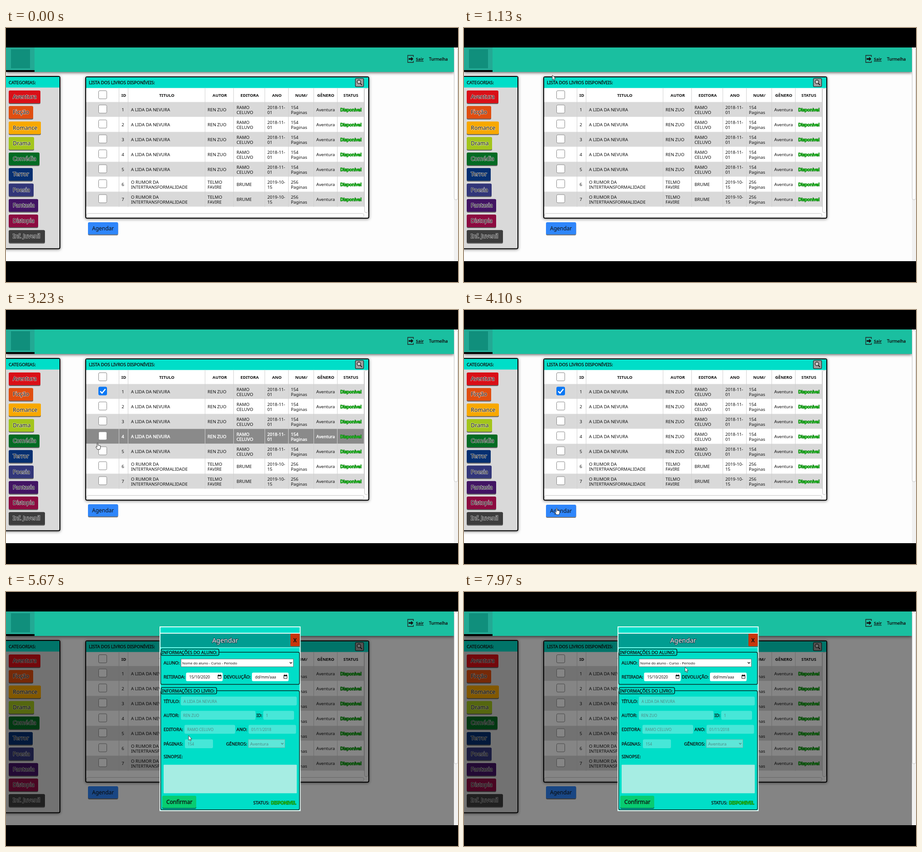
An HTML page that plays this animation: 998x561 px, repeating every 8000 ms.

```html
<!DOCTYPE html>
<html lang="pt-BR">
<head>
<meta charset="utf-8">
<title>Lista de livros</title>
<style>
html, body { margin: 0; width: 100%; height: 100%; overflow: hidden; background: #000; }
svg { display: block; font-family: "Noto Sans", "Open Sans", sans-serif; }
text { fill: #111; white-space: pre; }
.medium { stroke: #111; stroke-width: .35px; }
.bold { font-weight: 700; }
.halo { stroke: #fff; stroke-opacity: .7; stroke-width: 1.6px; paint-order: stroke; stroke-linejoin: round; }
.free { fill: #2cf52c; stroke: #08690b; stroke-width: 1.5px; paint-order: stroke; stroke-linejoin: round; }
.title { fill: #fff; stroke: #123; stroke-width: 1.6px; paint-order: stroke; }
.muted { fill: #4b8c86; }
.panel { filter: drop-shadow(0 1px 3px #0008); }
.row.hover .bg { fill: #8a8a8a; }
.row.hover .cell { fill: #fff; stroke: #fff; stroke-width: .4px; }
.tick { visibility: hidden; }
.checked .tick { visibility: visible; }
.checked .box { fill: #0a78f5; stroke: #0a78f5; }
.checked.over .box { fill: #0758bd; stroke: #0758bd; }
</style>
</head>
<body>
<svg id="stage" width="998" height="561" viewBox="0 0 998 561"></svg>
<script>
const TEAL = '#00dec8';
const BOOK = 'A LIDA DA NEVURA', AUTHOR = 'REN ZUO', PRESS = ['RAMO', 'CELUVO'];

const text = (x, y, s, size = 9.7, cls = '', anchor = 'start') =>
  `<text x="${x}" y="${y}" font-size="${size}" class="${cls}" text-anchor="${anchor}">${s}</text>`;
const rect = (x, y, w, h, fill, r = 0, extra = '') =>
  `<rect x="${x}" y="${y}" width="${w}" height="${h}" rx="${r}" fill="${fill}" ${extra}/>`;
const path = (d, stroke, width, fill = 'none') =>
  `<path d="${d}" fill="${fill}" stroke="${stroke}" stroke-width="${width}"/>`;
const label = (x, y, s, size = 9.6) => text(x, y, s, size, 'medium');
const pill = (x, y, w, h) => rect(x, y, w, h, '#fcfcfc', 4, 'stroke="#c4c4c4"');
const button = (x, y, w, h, fill) =>
  rect(x, y + 1, w, h, '#0008', 3) + rect(x, y, w, h - 1, fill, 3);
const checkbox = y => `<g class="check">` +
  rect(204.5, y - 9, 18, 18, '#fff', 2.5, 'stroke="#858585" class="box"') +
  `<path class="tick" d="M208 ${y + .5}l4 4 7.5-9" fill="none" stroke="#fff" stroke-width="2.6"/></g>`;

function sidebar() {
  const items = [
    ['Aventura', 70, '#d90f17'], ['Ficção', 54, '#e04e10'], ['Romance', 71, '#f8a800'],
    ['Drama', 56, '#a3c51c'], ['Comédia', 68, '#046b23'], ['Terror', 53, '#062f70'],
    ['Poesia', 55, '#323679'], ['Fantasia', 65, '#421463'], ['Distopia', 65, '#8c0b40'],
    ['Inf. Juvenil', 80, '#3d3d3d']];
  return `<g class="panel">` + rect(-4, 107, 123, 380.5, '#d9d9d9', 3, 'stroke="#000" stroke-width="2"') + `</g>` +
    rect(0, 108, 118, 23.5, TEAL) + label(6, 123.5, 'CATEGORIAS:') +
    items.map(([name, w, fill], i) => {
      const y = 138 + 34.25 * i;
      return button(6, y, w, 29, fill) + text(15, y + 18, name, 12.4, 'halo');
    }).join('');
}

function bookTable() {
  const edges = [177, 250, 270, 440, 503, 572, 624, 680, 732, 791];
  const heads = [[260, 'ID'], [355, 'TITULO'], [472, 'AUTOR'], [538, 'EDITORA'],
    [598, 'ANO'], [652, 'NUM/'], [706, 'GÊNERO'], [761.5, 'STATUS']];
  const first = [[BOOK], [AUTHOR], PRESS, ['2018-11-', '01'], ['154', 'Paginas'], ['Aventura']];
  const second = [['O RUMOR DA', 'INTERTRANSFORMALIDADE'], ['TELMO', 'FAVIRE'], ['BRUME'],
    ['2019-10-', '15'], ['256', 'Paginas'], ['Aventura']];
  const columns = [276, 445, 509, 577, 629, 685];
  const cell = (x, y, lines) => lines.map((s, i) =>
    text(x, y + (lines.length > 1 ? 14.5 + 11 * i : 20), s, 9.7, 'cell')).join('');

  let out = `<g class="panel">` + rect(176, 108, 625, 312, '#fff', 3, 'stroke="#000" stroke-width="2"') + `</g>` +
    rect(177, 109, 623, 23.5, TEAL) + label(183, 124, 'LISTA DOS LIVROS DISPONÍVEIS:') +
    rect(771.5, 111.5, 18, 18, '#a3a3a3', 2, 'stroke="#333" stroke-width="1.5"') +
    `<circle cx="779.3" cy="119" r="4" fill="#ccc" stroke="#222" stroke-width="1.5"/>` +
    path('M782 122l4 4', '#222', 2) + checkbox(147.5) +
    heads.map(([x, s]) => text(x, 152, s, 9.2, 'bold', 'middle')).join('');
  for (let i = 0; i < 7; i++) {
    const y = 163.5 + 33 * i;
    out += `<g class="row">` + rect(177, y, 614, 33, i % 2 ? '#fff' : '#d9d9d9', 0, 'class="bg"') +
      checkbox(y + 15.5) + text(258, y + 20.5, i + 1, 9.7, 'cell', 'middle') +
      (i < 5 ? first : second).map((lines, c) => cell(columns[c], y + .5, lines)).join('') +
      text(761.5, y + 20.5, 'Disponivel', 9.6, 'free', 'middle') + `</g>`;
  }
  return out + edges.slice(1).map(x => path(`M${x - .5} 132.5V395`, '#d0d0d0', 1)).join('') +
    pill(791.5, 133, 8, 275) + pill(177.5, 409.5, 613, 8);
}

function header() {
  return rect(0, 43, 989, 54, '#1abfa0', 0, 'style="filter:drop-shadow(0 2px 3px #0009)"') +
    rect(0, 43, 63, 54, '#23a994') + rect(0, 93, 63, 4, '#000') +
    rect(11, 47, 42, 42, '#108f7c') +
    path('M899.5 64v-3.500h-12.500v15.500h12.500v-3.500', '#222', 1.3) +
    path('M889 66.700h5.500v-3l5 4.600-5 4.600v-3h-5.500z', 'none', 0, '#111') +
    text(905, 72, 'Sair', 9, 'bold') + path('M905 73.700h17', '#111', 1) +
    label(934, 72, 'Turmelha', 9.3) +
    rect(989, 43, 9, 472, '#f1f1f1') + pill(989.5, 44.5, 8, 335);
}

function modal() {
  const frame = (y, h, w, s) =>
    rect(341.5, y, 306.5, h, 'none', 3, 'stroke="#062b28" stroke-width="1.6"') +
    rect(342.5, y - 7, w, 14, TEAL, 3, 'stroke="#062b28" stroke-width="1.6"') + label(344, y + 3.7, s);
  const field = (x, y, w, s, dx = 6) =>
    rect(x, y, w, 19.5, '#fff', 3, 'fill-opacity=".28"') + text(x + dx, y + 13.5, s, 8.3, 'muted');
  const date = (x, s, size) => rect(x, 178, 81, 19, '#fff', 3) + text(x + 7, 191, s, size) +
    path(`M${x + 70.5} 184h7v7h-7zM${x + 72} 182v2m4-2v2`, '#111', 1) + rect(x + 70, 183.5, 8, 2.5, '#111');
  return rect(340, 77, 309.5, 406, TEAL, 0, 'stroke="#eafffb" stroke-width="2"') +
    rect(341, 90, 308, 2, '#eafffb') + rect(341, 92, 308, 30, '#009d91') + rect(341, 122, 308, 1.5, '#8ff3e8') +
    text(484, 112, 'Agendar', 14.3, 'title', 'middle') +
    rect(628, 92, 20.500, 28, '#c8350b', 2) + text(638.2, 110.500, 'X', 11.5, 'bold', 'middle') +
    frame(133, 71, 127.5, 'INFORMAÇÕES DO ALUNO:') +
    label(348, 160, 'ALUNO:') + rect(386.500, 148, 248, 17, '#fff', 0, 'stroke="#777"') +
    text(389, 159.500, 'Nome do aluno - Curso - Periodo', 7.9) + path('M626.500 155l2.500 2.700 2.500-2.700', '#111', 1.4) +
    label(348, 191, 'RETIRADA:') + date(397.500, '15/10/2020', 8.6) +
    label(481, 191, 'DEVOLUÇÃO:') + date(543, 'dd/mm/aaa', 8.4) +
    frame(218, 263, 122.5, 'INFORMAÇÕES DO LIVRO:') +
    label(348, 244.500, 'TÍTULO:') + field(386, 231, 256, BOOK) +
    label(348, 276, 'AUTOR:') + field(386, 262.500, 165, AUTHOR, 5) + label(553, 276, 'ID:') + field(568, 262.500, 68, '1') +
    label(348, 307, 'EDITORA:') + field(394, 293.500, 112, PRESS.join(' ')) +
    label(509, 307, 'ANO:') + field(535.500, 293.500, 105, '01/11/2018') +
    label(348, 338.500, 'PÁGINAS:') + field(395, 325.500, 62, '154') + label(486, 338.500, 'GÊNEROS:') +
    rect(535.500, 326, 80, 17.5, '#5fe6d8', 0, 'stroke="#7fb9b2"') + text(539, 338.500, 'Aventura', 9.5, 'muted') +
    path('M607.500 333.500l2.500 2.700 2.500-2.700', '#4b8c86', 1.4) +
    label(348, 367, 'SINOPSE:') + rect(348, 381.500, 294, 63, '#a6ede3', 1) +
    button(345, 450, 75, 28, '#08cc70') + text(354, 468, 'Confirmar', 12, 'medium') +
    label(546, 468.500, 'STATUS:') + text(585, 468.500, 'DISPONIVEL', 9.6, 'free');
}

document.getElementById('stage').innerHTML =
  rect(0, 43, 998, 472, '#fdfdfd') + sidebar() + bookTable() +
  `<g id="schedule">` + button(181, 429, 66.500, 28, '#2f86fb') + text(190, 447, 'Agendar', 12) + `</g>` +
  `<g id="dim">` + rect(0, 43, 989, 472, '#000', 0, 'fill-opacity=".48"') + `</g>` + header() +
  `<g id="modal">` + modal() + `</g>` +
  `<g id="cursor"><g id="arrow">` + path('M0 0v10.500l2.400-2.200 1.700 3.800 1.700-.8-1.700-3.600h3.300z', '#222', .8, '#fff') + `</g>` +
  `<g id="hand">` + path('M-1 8V1q0-1.300 1.100-1.300T1.200 1v4q1-.8 2 .3 1-.7 1.800.4 1.500-.4 1.600 1V10l-1.200 4H-.3l-3-4.500q-.8-1.300.3-1.700.9-.2 2 1.200z', '#222', .9, '#fff') +
  `</g></g>` + rect(0, 0, 998, 43, '#000') + rect(0, 515, 998, 46, '#000');

const LOOP = 8000, ENTER = 700, CHECK = 2300, OPEN = 4200;
const route = [[ENTER, 188, 34], [1130, 195, 104], [1900, 211, 183], [2650, 211, 183],
  [3230, 202, 294], [3800, 204.5, 438], [4650, 204.5, 438], [5500, 403, 317], [6200, 403, 317], [7400, 488, 166]];
const get = id => document.getElementById(id);
const show = (id, on) => { get(id).style.visibility = on ? 'visible' : 'hidden'; };
const rows = [...document.querySelectorAll('.row')];

function pointer(t) {
  const i = route.findIndex(p => p[0] > t);
  if (i < 1) return (i ? route.at(-1) : route[0]).slice(1);
  const [a, b] = [route[i - 1], route[i]], u = (t - a[0]) / (b[0] - a[0]), k = u * u * (3 - 2 * u);
  return [a[1] + (b[1] - a[1]) * k, a[2] + (b[2] - a[2]) * k];
}

function draw(now) {
  const t = now % LOOP, open = t >= OPEN, [x, y] = pointer(t);
  const active = !open && t >= ENTER && x > 177 && x < 791;
  const hovered = active ? Math.floor((y - 163.5) / 33) : -1;
  const onRow = hovered >= 0 && hovered < 7;
  const onBox = onRow && Math.abs(x - 213.5) < 10 && Math.abs(y - 179 - 33 * hovered) < 10;
  const onButton = active && x > 181 && x < 247 && y > 429 && y < 457;
  rows.forEach((row, i) => row.classList.toggle('hover', i === hovered));
  const box = rows[0].querySelector('.check').classList;
  box.toggle('checked', t >= CHECK && !open);
  box.toggle('over', onBox && hovered === 0);
  const hand = (onRow && !onBox) || onButton;
  show('cursor', t >= ENTER);
  get('arrow').style.display = hand ? 'none' : '';
  get('hand').style.display = hand ? '' : 'none';
  get('cursor').setAttribute('transform', `translate(${x} ${y})`);
  get('schedule').setAttribute('transform', `translate(0 ${onButton ? 1 : 0})`);
  show('dim', open);
  show('modal', open);
}

const start = performance.now();
function tick() {
  draw(performance.now() - start);
  requestAnimationFrame(tick);
}
tick();
</script>
</body>
</html>
```
